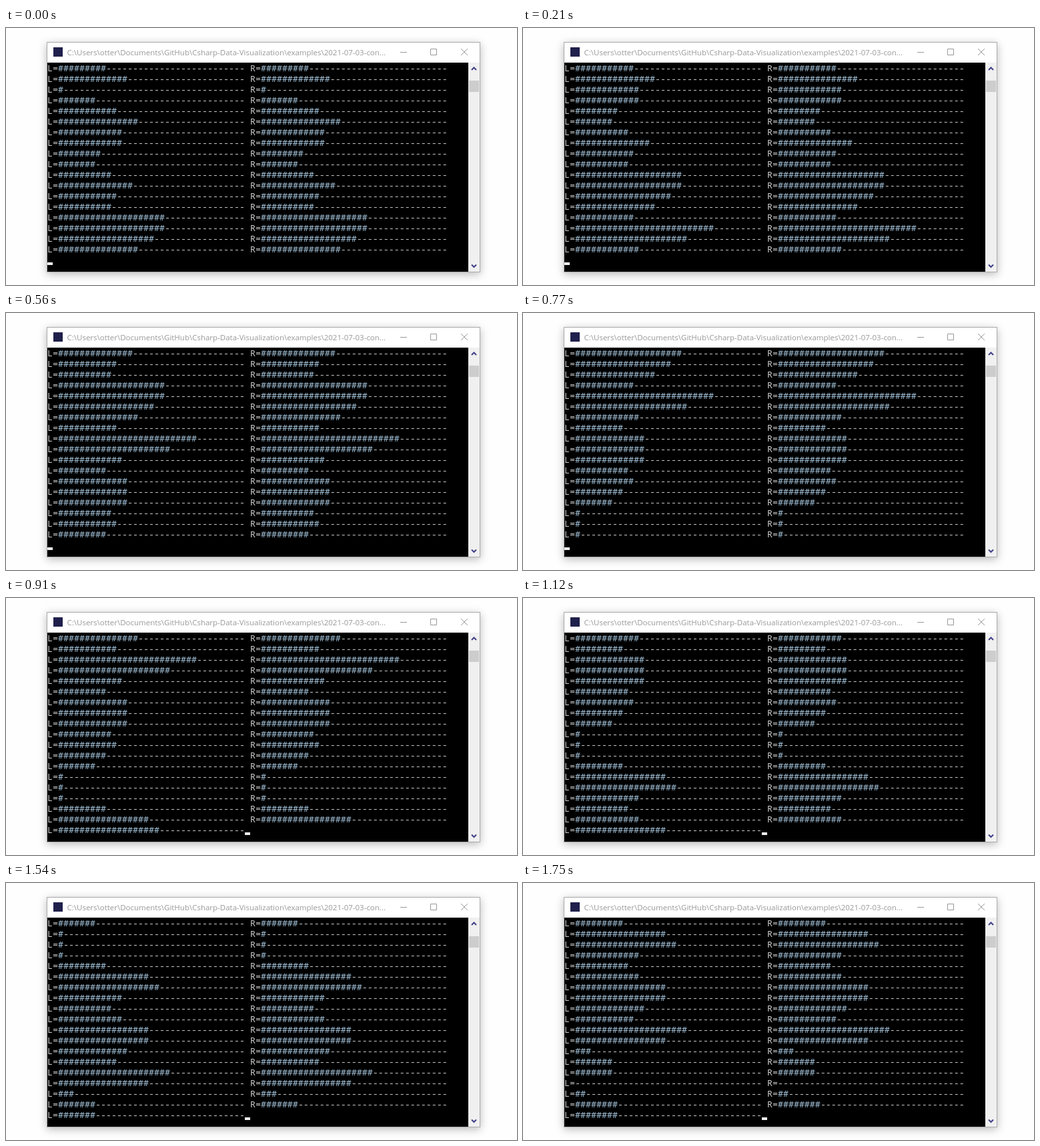
Write an HTML page that moves like this. It is 766 by 386 pixels and loops after 1.82 s.

```html
<!DOCTYPE html>
<html lang="en">
<head>
<meta charset="utf-8">
<title>Console level meter</title>
<style>
  html, body { margin: 0; width: 100%; height: 100%; overflow: hidden; background: #fefefe; }
  .window {
    position: absolute; left: 61px; top: 21px; width: 650px; height: 346px;
    box-shadow: 0 3px 12px rgba(0, 0, 0, .27);
  }
  svg { position: absolute; left: 0; top: 0; display: block; }
  .title { font: 11.5px "Open Sans", "Noto Sans", sans-serif; fill: #999; }
  .console { font: 13.3333px "Noto Sans Mono", "DejaVu Sans Mono", monospace; fill: #ccc; }
  .console text { white-space: pre; }
  .level { fill: #a8c8e0; }
  .buttons { fill: none; stroke: #999; }
  .arrows { fill: none; stroke: #404088; stroke-width: 2; }
</style>
</head>
<body>
<div class="window"></div>
<svg width="766" height="386" viewBox="0 0 766 386">
  <defs>
    <clipPath id="written">
      <rect x="62" y="52" width="631" height="288"/>
      <rect id="partial" x="62" y="340" width="0" height="16"/>
    </clipPath>
  </defs>

  <rect x="61.5" y="21.5" width="649" height="345" fill="#fff" stroke="#aaa"/>
  <rect x="71" y="29" width="14" height="14" fill="#20204c"/>
  <text class="title" x="91.5" y="41">C:\Users\otter\Documents\GitHub\Csharp-Data-Visualization\examples\2021-07-03-con...</text>
  <path class="buttons" d="M591 36.5h10M636.5 31.5h9v9h-9zM682 31l10 10M692 31l-10 10"/>

  <rect x="62" y="52" width="631" height="314"/>
  <rect x="693" y="52" width="17" height="314" fill="#f0f0f0"/>
  <rect id="thumb" x="694" y="79" width="15" height="17" fill="#cdcdcd"/>
  <path class="arrows" d="M698 63l3.5-3.5 3.5 3.5M698 355.5l3.5 3.5 3.5-3.5"/>

  <g class="console" clip-path="url(#written)"><g id="lines"></g></g>
  <rect id="cursor" x="62" y="352" width="8" height="4" fill="#f2f2f2"/>
</svg>
<script>
const CHAR = 8, ROW = 16, LEFT = 62, BASELINE = 65, BAR = 35;
const STEP = 70, LOOP = 1820;
const HALF_LINE = (BAR + 2) * CHAR;

const levels = [
  9, 13, 1, 7, 11, 15, 12, 12, 8, 7, 10, 14, 11, 10, 20, 20, 18, 15,
  11, 26, 21, 12, 9, 13, 13, 13, 10, 11, 9, 7, 1, 1, 1, 9, 17,
  19, 12, 10, 12, 17, 17, 13, 11, 21, 17, 3, 7, 7, 0, 2, 8, 8
];

const byId = id => document.getElementById(id);
const [lines, partial, cursor, thumb] = ["lines", "partial", "cursor", "thumb"].map(byId);

const meter = (name, level) =>
  `${name}=<tspan class="level">${"#".repeat(level)}</tspan>${"-".repeat(BAR - level)}`;

lines.innerHTML = levels.map((level, i) =>
  `<text x="${LEFT}" y="${BASELINE + i * ROW}">${meter("L", level)} ${meter("R", level)}</text>`
).join("");

function draw(now) {
  const step = Math.floor((now % LOOP) / STEP);
  // Four lines arrive every three steps; one step catches a line half written.
  const scrolled = Math.floor((4 * step + 1) / 3);
  const written = step % 3 === 1 ? HALF_LINE : 0;

  lines.setAttribute("transform", `translate(0 ${-scrolled * ROW})`);
  partial.setAttribute("width", written);
  cursor.setAttribute("x", LEFT + written);
  thumb.setAttribute("y", step < 21 ? 79 : 80);
}

function tick() {
  draw(performance.now());
  requestAnimationFrame(tick);
}
tick();
</script>
</body>
</html>
```
